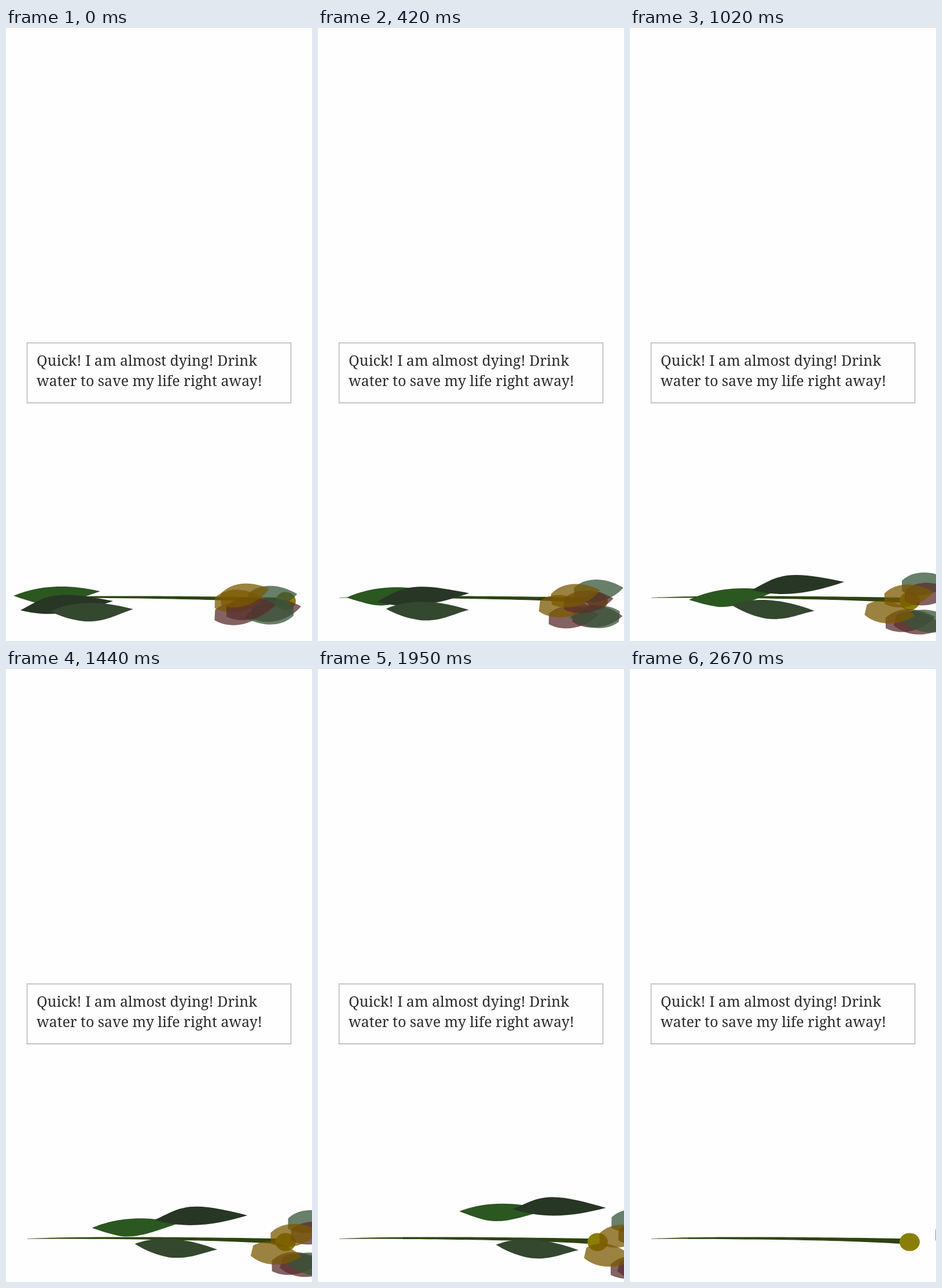
An HTML page that plays this animation: 529x1058 px, repeating every 2.7 s.

```html
<!DOCTYPE html>
<html lang="en">
<head>
<meta charset="utf-8">
<style>
  html, body { margin: 0; width: 100%; height: 100%; overflow: hidden; background: #fefefe; }
  svg { display: block; width: 100%; height: 100%; }
  text { font-family: "Noto Serif", "Liberation Serif", serif; font-size: 25px; font-weight: 500; fill: #2b2b2b; }
</style>
</head>
<body>
<svg viewBox="0 0 529 1058">
  <rect width="529" height="1058" fill="#fefefe"/>
  <rect x="36.5" y="543.5" width="456" height="103.5" fill="none" stroke="#c4c4c4" stroke-width="2"/>
  <text x="53" y="583">Quick! I am almost dying! Drink</text>
  <text x="53" y="618">water to save my life right away!</text>
  <path fill="#2d4410" d="M37 983C120 979.5 220 979.5 468 983V992C380 986.5 240 983.5 37 983.6Z"/>
  <ellipse cx="483.4" cy="989" rx="17.6" ry="15.6" fill="#8a7e06"/>
  <g id="plant"></g>
</svg>
<script>
const LOOP = 2700, STEP = 30;
const OPEN = 1020, LEAVE = 1830, GONE = 2670;
const MAUVE = "#5a2e2e", GREEN = "#365538", GOLD = "#7a5800";
const plant = document.getElementById("plant");
const parts = [];

const brightLeaf = "M0 0C25 -9 75 -22 150 0C115 10 80 22 50 17C35 14 15 6 0 0Z";
const darkLeaf = "M0 0C18 -7 35 -16 50 -18C80 -24 120 -12 161 0C120 10 60 22 0 0Z";
const oliveLeaf = "M0 0C25 -12 70 -22 143 0C115 8 95 21 60 19C35 16 15 8 0 0Z";
const petalShape = "M1 -9C22 -25 55 -23 86 0C60 23 22 25 -1 9Z";

const pose = (x, y, angle) => ({ x, y, angle });

function mixPoses(a, b, amount) {
  const mix = key => a[key] + (b[key] - a[key]) * amount;
  return pose(mix("x"), mix("y"), mix("angle"));
}

function addPart(shape, fill, opacity, path) {
  const node = document.createElementNS("http://www.w3.org/2000/svg", "path");
  node.setAttribute("d", shape);
  node.setAttribute("fill", fill);
  node.setAttribute("fill-opacity", opacity);
  plant.appendChild(node);
  parts.push({ node, path });
}

// Leaves drift at one speed, level out, and all leave at the same x.
function addLeaf(shape, fill, start, open, driftY, goneY) {
  const angle = (open.angle + 3.5) / 2;
  const drifted = pose(open.x + 90, open.y + driftY, angle);
  addPart(shape, fill, 1, { start, open, drifted, gone: pose(558, goneY, angle), ease: 1 });
}

// Petals fan out from the flower's axis; lower ones leave faster.
function addPetal(fill, start, open) {
  const { x, y, angle } = open;
  const drifted = pose(x + 34, y + (y - 1004) * 0.27, angle);
  const gone = pose(drifted.x + 88 + 2.9 * (y - 985), drifted.y + 25, angle);
  addPart(petalShape, fill, 0.75, { start, open, drifted, gone, ease: 0.85 });
}

addLeaf(brightLeaf, "#2b5720", pose(13, 980, -3), pose(102, 987, -5.5), -43, 888);
addLeaf(darkLeaf, "#283625", pose(25, 1005, -5.7), pose(210, 970, -5), -37, 926);
addLeaf(oliveLeaf, "#33482f", pose(77, 1007, -1.6), pose(176, 996, 4), -7, 1022);

addPetal(MAUVE, pose(361, 1013, -3), pose(442, 1027, -7));
addPetal(MAUVE, pose(425, 1010, -8), pose(458, 1022, 8));
addPetal(GREEN, pose(497, 1005, 172), pose(548, 1028, 187));
addPetal(GREEN, pose(418, 986, -6), pose(470, 963, -6));
addPetal(GOLD, pose(361, 992, -5), pose(407.5, 1004, 6.7));
addPetal(MAUVE, pose(381, 1007, -8), pose(475, 980, -5));
addPetal(GOLD, pose(371, 987, -13), pose(440, 985, -8));

function poseAt({ start, open, drifted, gone, ease }, time) {
  if (time < OPEN) return mixPoses(start, open, (time / OPEN) ** ease);
  if (time < LEAVE) return mixPoses(open, drifted, (time - OPEN) / (LEAVE - OPEN));
  return mixPoses(drifted, gone, (time - LEAVE) / (GONE - LEAVE));
}

function render(time) {
  for (const { node, path } of parts) {
    const { x, y, angle } = poseAt(path, time);
    node.setAttribute("transform", `translate(${x} ${y}) rotate(${angle})`);
  }
}

const begin = performance.now();
function tick() {
  const time = (performance.now() - begin) % LOOP;
  render(Math.floor(time / STEP) * STEP);
  requestAnimationFrame(tick);
}
tick();
</script>
</body>
</html>
```
